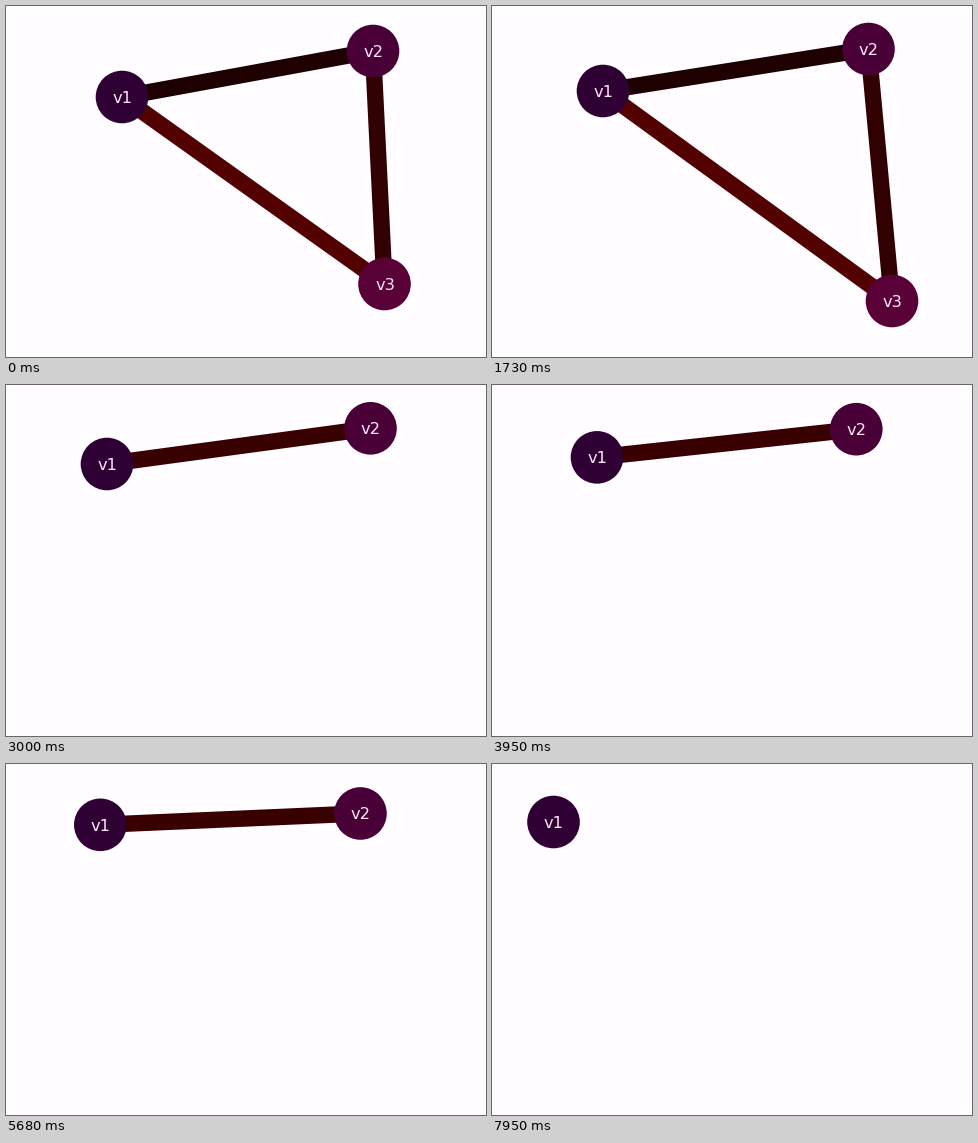
Animation of 480x351 px, one loop 8 s. Source, as a matplotlib script:

```python
import numpy as np
import matplotlib.pyplot as plt
from matplotlib.animation import FuncAnimation
from matplotlib.patches import Circle

W, H, DPI = 480, 351, 72      # at 72 dpi one point is one pixel
LOOP, STEP = 8000, 50
RADIUS, BAR = 26.3, 16.4
BEAT, STRETCH, SWING = 800, 0.06, 0.05


def spring(ms, swing):
    """Complex factor that stretches and turns the graph on each beat."""
    s = np.sin(np.pi * (ms - 100) / BEAT) ** 2
    turn = swing * np.tanh((ms - 6500) / 400)
    return (1 + STRETCH * s) * np.exp(1j * turn * s)


def about_center(pts, factor):
    c = pts.mean()
    return c + (pts - c) * factor


class Stage:
    """Nodes drifting from pose to pose, pulsing around their center."""

    def __init__(self, swing, poses):
        self.swing, self.times = swing, list(poses)
        self.rest = np.array([about_center(np.array(p), 1 / spring(t, swing))
                              for t, p in poses.items()])

    def pose(self, ms):
        drift = np.array([np.interp(ms, self.times, path) for path in self.rest.T])
        return about_center(drift, spring(ms, self.swing))


# points are x + y*1j in pixels; each stage has one node fewer
STAGES = [
    Stage(0, {0: [116 + 91j, 367 + 45j, 378.5 + 278j],
              950: [103 + 78j, 375.5 + 34.5j, 387 + 284.5j],
              1700: [111 + 85j, 376.5 + 43j, 400 + 295j],
              2700: [98 + 79j, 367 + 42j, 408 + 277j]}),
    Stage(SWING, {2700: [98 + 79j, 367 + 42j],
                  3000: [101 + 79j, 364.5 + 43.3j],
                  4900: [107.5 + 67.5j, 365.5 + 43.3j],
                  6500: [80 + 52.7j, 341.3 + 57j],
                  7700: [60.5 + 49j, 338 + 72j]}),
    Stage(0, {7700: [60.5 + 49j], 7950: [61.5 + 58j]}),
]
NODE_COLORS = ["#2f0033", "#490037", "#590037"]
EDGE_COLORS = {(0, 1): "#1e0000", (1, 2): "#310000", (0, 2): "#520000"}
LONE_EDGE = "#380000"

fig = plt.figure(figsize=(W / DPI, H / DPI), dpi=DPI, facecolor="#fffdff")
ax = fig.add_axes((0, 0, 1, 1))
ax.set(xlim=(0, W), ylim=(H, 0))
ax.axis("off")

bars = {pair: ax.plot([], [], color=color, lw=BAR, solid_capstyle="butt", zorder=1)[0]
        for pair, color in EDGE_COLORS.items()}
disks = [ax.add_patch(Circle((0, 0), RADIUS, fc=color, lw=0, zorder=2))
         for color in NODE_COLORS]
labels = [ax.text(0, 0, f"v{i + 1}", color="#ffe6fa", size=16.3, family="DejaVu Sans",
                  ha="center", va="baseline", zorder=3) for i in range(3)]


def draw(i):
    ms = i * STEP
    stage = next((s for s in STAGES if ms < s.times[-1]), STAGES[-1])
    pts = stage.pose(ms)
    alive = len(pts)
    for k, (disk, label) in enumerate(zip(disks, labels)):
        disk.set_visible(k < alive)
        label.set_visible(k < alive)
        if k < alive:
            x, y = pts[k].real, pts[k].imag
            disk.center = x, y
            label.set_position((x + 0.5, y + 5.8))
    for (a, b), bar in bars.items():
        bar.set_visible(b < alive)
        if b < alive:
            ends = pts[[a, b]]
            bar.set_data(ends.real, ends.imag)
            bar.set_color(EDGE_COLORS[a, b] if alive == 3 else LONE_EDGE)
    return []


anim = FuncAnimation(fig, draw, frames=LOOP // STEP, interval=STEP,
                     repeat=True, repeat_delay=0)
plt.show()
```
